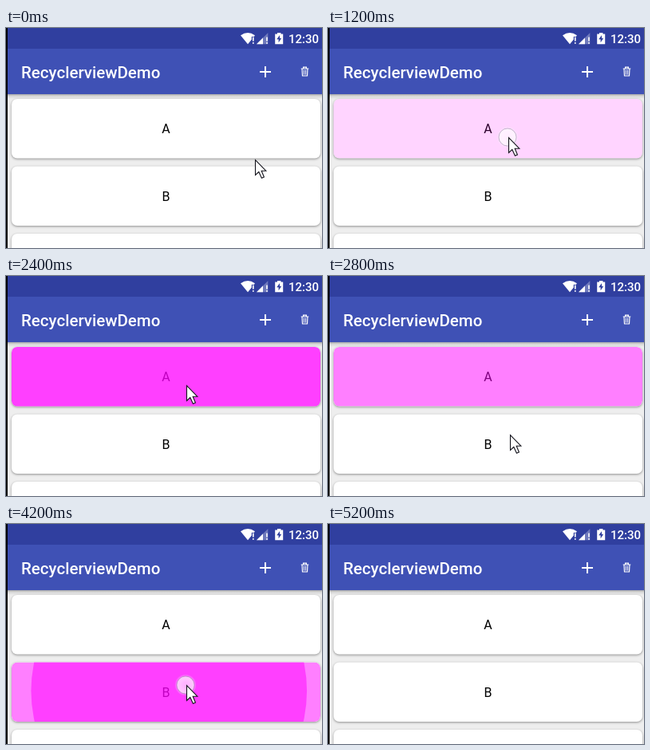
Write an HTML page that moves like this. It is 396x276 px and loops after 5800 ms.

```html
<!DOCTYPE html>
<html lang="en">
<head>
<meta charset="utf-8">
<title>List ripple</title>
<style>
  html, body { margin: 0; width: 100%; height: 100%; overflow: hidden; background: #eee; }
  svg { display: block; width: 396px; height: 276px; font-family: Roboto, sans-serif; }
  .card { fill: #fff; filter: drop-shadow(0 1.8px 1.7px rgba(0, 0, 0, .4)); }
  .label { font-size: 16px; text-anchor: middle; fill: #000; }
  .tint { fill: #f0f; }
</style>
</head>
<body>
<svg viewBox="0 0 396 276">
  <defs>
    <linearGradient id="shade" x2="0" y2="1">
      <stop offset="0" stop-opacity=".3"/>
      <stop offset=".4" stop-opacity=".1"/>
      <stop offset="1" stop-opacity="0"/>
    </linearGradient>
    <radialGradient id="glow">
      <stop offset=".3" stop-color="#fff" stop-opacity=".52"/>
      <stop offset="1" stop-color="#fff" stop-opacity=".68"/>
    </radialGradient>
  </defs>
  <rect width="396" height="276" fill="#eee"/>
  <g id="list"></g>

  <rect y="83" width="396" height="6" fill="url(#shade)"/>
  <rect width="396" height="83" fill="#3f51b5"/>
  <rect width="396" height="26" fill="#303f9f"/>
  <text x="19" y="63" font-size="20.5" font-weight="500" fill="#fff">RecyclerviewDemo</text>

  <g fill="#fff">
    <path d="M294 9.2Q303 2.8 312 9.2L310.8 10.7H307.8V14.5L303 20.3Z"/>
    <path d="M309 11.5h1.6v5h-1.6zM309 18h1.6v1.8h-1.6z"/>
    <path d="M328.3 6V20.3H314Z" opacity=".3"/>
    <path d="M322 12.3V20.3H314Z"/>
    <path d="M326.2 11.5h1.6v5h-1.6zM326.2 18h1.6v1.8h-1.6z"/>
    <path d="M337.2 7.5H340V6h4.4v1.5h2.8V20.3h-10z"/>
    <text x="354" y="19" font-size="15" font-weight="500">12:30</text>
  </g>
  <path d="M343 9L339.2 14.3H341.6V18.3L345.2 12.8H343Z" fill="#303f9f"/>
  <g stroke="#fff" fill="none">
    <path d="M318 55H332M325 48V62" stroke-width="2"/>
    <path d="M369.7 51H379.3M372.6 51V49.2H376.4V51M371 51L371.5 60H377.5L378 51" stroke-width="1.2"/>
    <path d="M373.4 52.6V58.6M375.6 52.6V58.6"/>
  </g>
  <rect width="2" height="276" fill="#000"/>

  <g id="touch">
    <circle r="13" fill="#fff" opacity=".2"/>
    <circle r="11" fill="url(#glow)" stroke="#867c98" stroke-opacity=".5"/>
  </g>
  <path id="cursor" d="M.5 .5V19.5L4.8 15.5L8.4 23.2L11.4 22L8.2 14.2H13.8Z"
        fill="#fff" stroke="#14141c" stroke-width="1.1"/>
</svg>
<script>
const LOOP = 5800, TICK = 200;
const CENTER_X = 201, TOUCH_X = 225;
const FADE_IN = 120, FADE_OUT = 270;
const SPEED = .216;              // ripple growth, px per ms
const LIFT = 1100, RIPPLE_END = 1500, GONE = 1920;

const $ = id => document.getElementById(id);
const clamp = v => Math.min(1, Math.max(0, v));
const show = (el, on) => el.setAttribute("visibility", on ? "visible" : "hidden");
const place = (el, x, y) => el.setAttribute("transform", `translate(${x} ${y})`);

const cards = [
  { name: "A", touchY: 137, tapAt: 1160 },
  { name: "B", touchY: 202, tapAt: 3280 },
  { name: "", touchY: 0, tapAt: Infinity }
].map((card, i) => ({ ...card, y: 89 + i * 84.5 }));

const cursorStops = [
  { at: 0, x: 312, y: 165 },
  { at: 200, x: 214, y: 143 },
  { at: 600, x: 226, y: 137 },
  { at: 2800, x: 228, y: 199 },
  { at: 3000, x: 226, y: 202 }
];
const CURSOR_END = 5200;

$("list").innerHTML = cards.map(({ name, y }, i) => {
  const box = `x="7" y="${y}" width="387" height="74.5" rx="7"`;
  return `<rect class="card" ${box}/>
    <text class="label" x="200.5" y="${y + 43}">${name}</text>
    <clipPath id="clip${i}"><rect ${box}/></clipPath>
    <g clip-path="url(#clip${i})">
      <rect id="wash${i}" class="tint" ${box}/>
      <circle id="ripple${i}" class="tint" opacity=".5"/>
    </g>`;
}).join("");

function drawCard({ y, touchY, tapAt }, i, t) {
  const age = t - tapAt;
  const wash = .5 * clamp(age / FADE_IN) * clamp((GONE - age) / FADE_OUT);
  const radius = age < RIPPLE_END ? Math.max(0, SPEED * (age - FADE_IN)) : 0;
  // The centre drifts from the finger to the middle of the card.
  const drift = clamp(radius / 200);
  const ripple = $("ripple" + i);
  $("wash" + i).setAttribute("opacity", wash);
  ripple.setAttribute("r", radius);
  ripple.setAttribute("cx", TOUCH_X + (CENTER_X - TOUCH_X) * drift);
  ripple.setAttribute("cy", touchY + (y + 37 - touchY) * drift);
}

function draw(t) {
  cards.forEach((card, i) => drawCard(card, i, t));

  const held = cards.find(({ tapAt }) => t >= tapAt && t < tapAt + LIFT);
  show($("touch"), held);
  if (held) place($("touch"), TOUCH_X, held.touchY);

  const { x, y } = cursorStops.findLast(({ at }) => at <= t);
  show($("cursor"), t < CURSOR_END);
  place($("cursor"), x, y);
}

const start = performance.now();
function tick() {
  const t = (performance.now() - start) % LOOP;
  draw(Math.floor(t / TICK) * TICK);
  requestAnimationFrame(tick);
}
tick();
</script>
</body>
</html>
```
